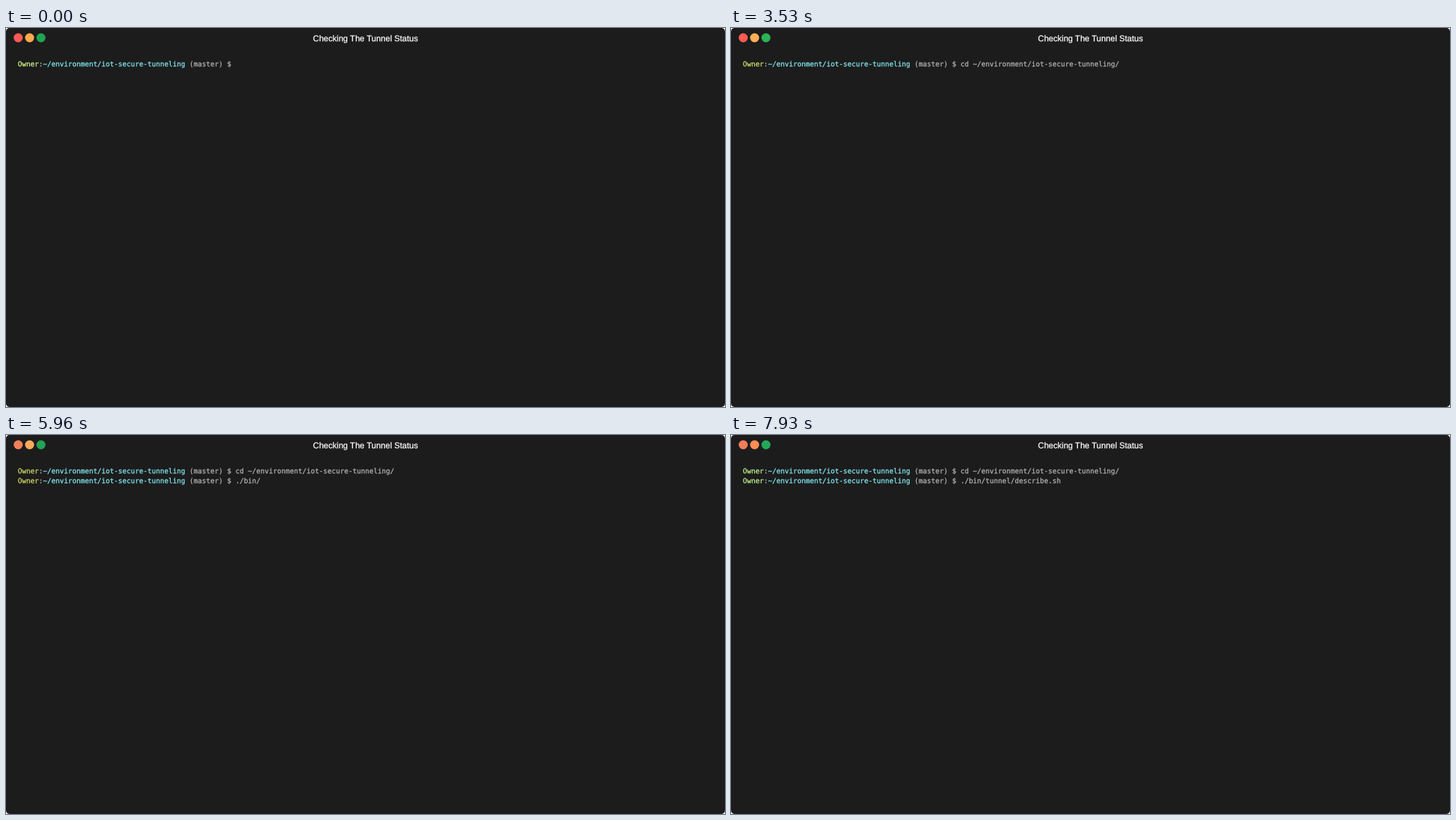
Animation, 1030 px wide and 543 px high, one loop 8 s. Source, as an HTML page:

```html
<!DOCTYPE html>
<html lang="en">
<head>
<meta charset="utf-8">
<title>Checking The Tunnel Status</title>
<style>
html, body { margin: 0; width: 100%; height: 100%; overflow: hidden; background: #fff; }
svg { display: block; }
text, tspan { fill: currentColor; stroke: currentColor; stroke-width: .25px; }
text { text-rendering: geometricPrecision; }
.term { font: 9.967px "DejaVu Sans Mono", monospace; white-space: pre; color: #b4b4b4; }
.path { color: #83eaf2; }
.title { font: 12px "Liberation Sans", Arial, sans-serif; color: #fff; text-anchor: middle; }
</style>
</head>
<body>
<svg width="1030" height="543" viewBox="0 0 1030 543">
  <rect width="1030" height="543" rx="5" fill="#1c1c1c"/>
  <g id="dots">
    <circle cx="17.5" cy="14" r="6.5"/>
    <circle cx="33.8" cy="14" r="6.5"/>
    <circle cx="50.1" cy="14" r="6.5"/>
  </g>
  <text class="title" x="515" y="19">Checking The Tunnel Status</text>
  <g id="lines" class="term"></g>
</svg>
<script>
const LOOP = 8000;
const NS = "http://www.w3.org/2000/svg";

// Each key press: [time, text it adds]
const first = [
  [250, "c"], [400, "d"], [1730, " ~"], [1990, "/"],
  [2540, "e"], [2650, "n"], [2770, "vironment/"],
  [3210, "i"], [3420, "o"], [3530, "t-secure-tunneling/"]
];
const second = [
  [5350, "."], [5570, "/"], [5690, "b"], [5880, "i"], [5960, "n/"],
  [6210, "t"], [6400, "u"], [6530, "nnel/"],
  [6930, "d"], [7010, "e"], [7710, "s"], [7930, "cribe.sh"]
];

// Colour themes: [start, user, red, amber, green]
const themes = [
  [0, "#d3f88a", "#ff5a54", "#fdaa4d", "#1fa551"],
  [2540, "#d6e26c", "#ff5a54", "#fbb056", "#2bb457"],
  [4010, "#d3da66", "#f27f59", "#f5aa5a", "#20a354"],
  [6400, "#c0f48e", "#f07d59", "#ff8c54", "#22a957"]
];

function span(parent, text, cls) {
  const el = document.createElementNS(NS, "tspan");
  el.textContent = text;
  if (cls) el.setAttribute("class", cls);
  parent.appendChild(el);
  return el;
}

function makeLine(y, start, keys) {
  const el = document.createElementNS(NS, "text");
  el.setAttribute("x", 17);
  el.setAttribute("y", y);
  const user = span(el, "Owner");
  span(el, ":");
  span(el, "~/environment/iot-secure-tunneling", "path");
  span(el, " (master) $ ");
  const typed = span(el, "");
  document.getElementById("lines").appendChild(el);
  return { el, user, typed, start, keys };
}

const lines = [makeLine(55, 0, first), makeLine(69, 4010, second)];
const dots = [...document.querySelectorAll("#dots circle")];

function draw(t) {
  const [, user, ...lights] = themes.filter(th => th[0] <= t).pop();
  dots.forEach((dot, i) => dot.setAttribute("fill", lights[i]));
  for (const line of lines) {
    line.el.setAttribute("visibility", t >= line.start ? "visible" : "hidden");
    line.user.style.color = user;
    line.typed.textContent = line.keys.filter(k => k[0] <= t).map(k => k[1]).join("");
  }
}

const origin = performance.now();
function tick() {
  draw((performance.now() - origin) % LOOP);
  requestAnimationFrame(tick);
}
draw(0);
requestAnimationFrame(tick);
</script>
</body>
</html>
```
